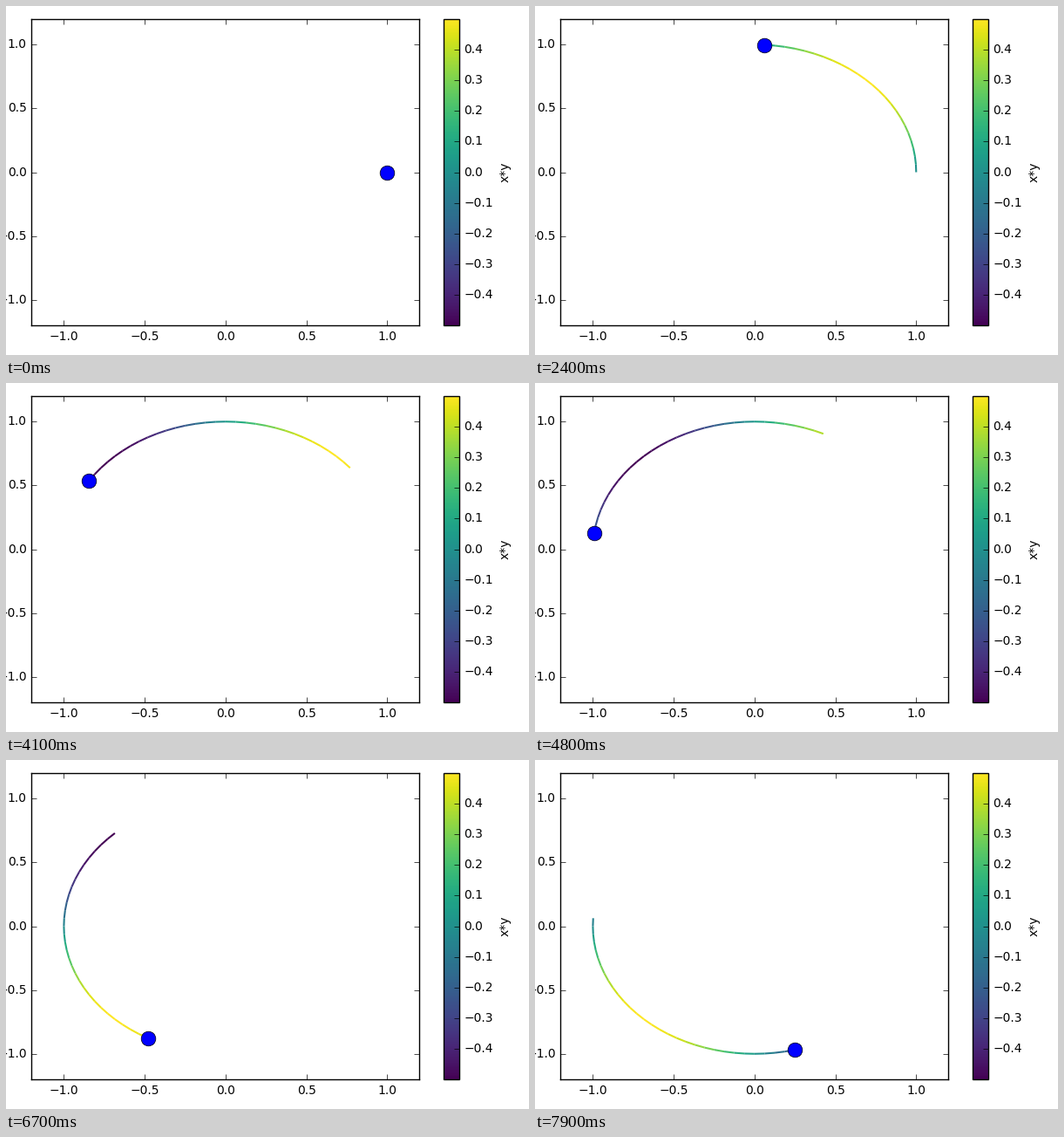
A matplotlib script for the animation above (8000 ms loop, 600x400 px).

```python
import numpy as np
import matplotlib.pyplot as plt
from matplotlib.animation import FuncAnimation
from matplotlib.collections import LineCollection

W, H = 600, 400
FRAMES, INTERVAL = 80, 100
STEPS = 100   # steps per full turn
TAIL = 30     # trail length in steps

plt.style.use("classic")
plt.rcParams.update({
    "font.family": "DejaVu Sans",
    "font.size": 10,
    "figure.facecolor": "white",
    "savefig.facecolor": "white",
})


def add_axes(left, top, width, height):
    """Add axes placed in pixels from the top left corner."""
    return fig.add_axes([left / W, 1 - (top + height) / H, width / W, height / H])


theta = 2 * np.pi * np.arange(STEPS + 1) / STEPS
x, y = np.cos(theta), np.sin(theta)
z = x * y
points = np.column_stack([x, y])
segments = np.stack([points[:-1], points[1:]], axis=1)

fig = plt.figure(figsize=(W / 100, H / 100), dpi=100)
ax = add_axes(29.3, 15, 445.1, 351)
ax.set_xlim(-1.2, 1.2)
ax.set_ylim(-1.2, 1.2)
ax.set_xticks(np.arange(-2, 3) / 2)
ax.set_yticks(np.arange(-2, 3) / 2)

trail = LineCollection([], cmap="viridis", norm=plt.Normalize(z.min(), z.max()),
                       linewidths=1.5)
ax.add_collection(trail)
ball, = ax.plot([], [], "o", color="blue", markersize=12,
                markeredgecolor="black", markeredgewidth=0.5)

cax = add_axes(502.3, 15, 17.5, 351)
bar = fig.colorbar(trail, cax=cax, ticks=np.arange(-4, 5) / 10)
bar.set_label("x*y")


def update(i):
    start = max(0, i - TAIL)
    trail.set_segments(segments[start:i])
    trail.set_array(z[start:i])
    ball.set_data([x[i]], [y[i]])
    return trail, ball


anim = FuncAnimation(fig, update, frames=FRAMES, interval=INTERVAL,
                     init_func=lambda: update(0), repeat=True, repeat_delay=0)
plt.show()
```
